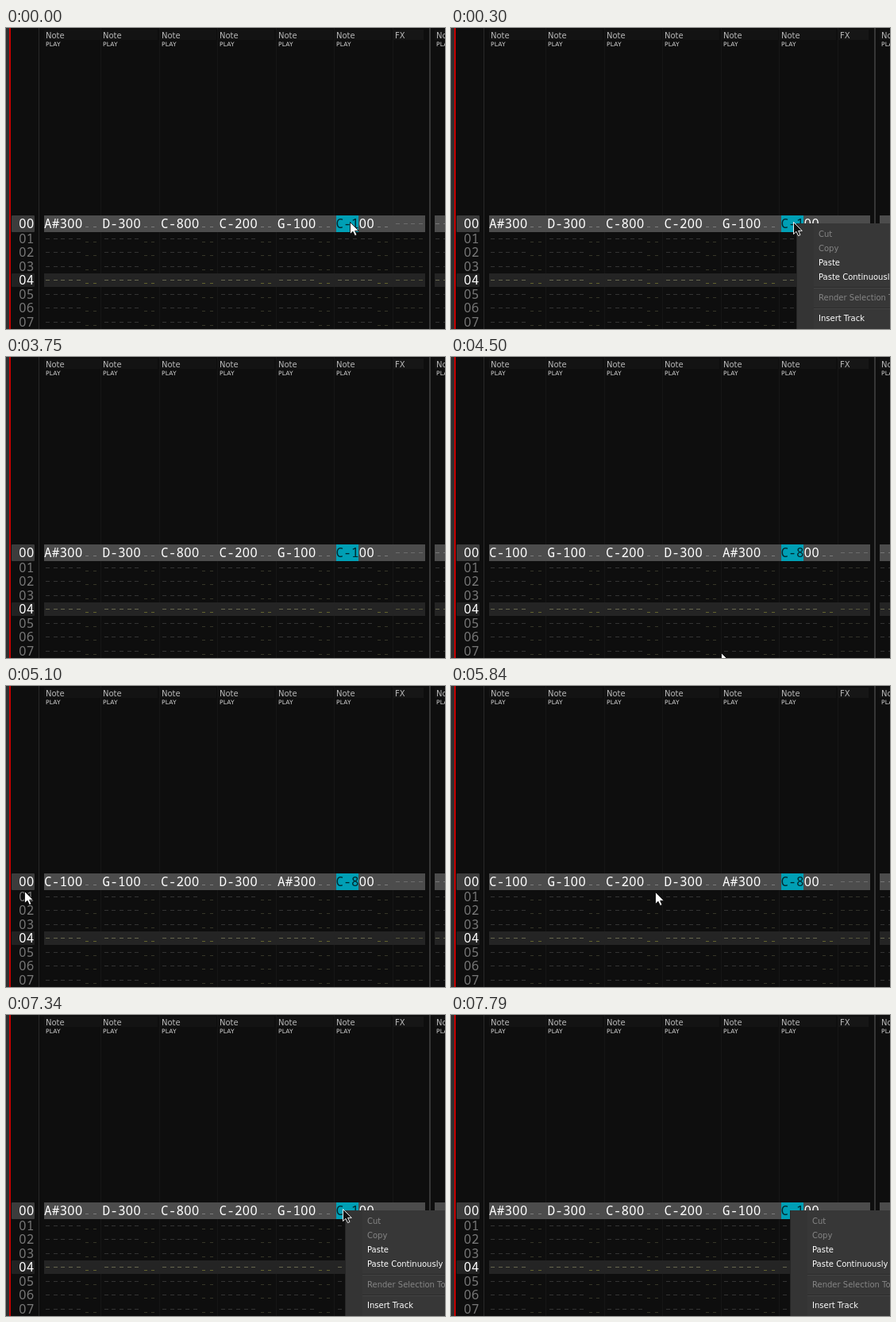
An HTML page that plays this animation: 553 px wide and 379 px high, repeating every 8000 ms.

```html
<!DOCTYPE html>
<html lang="en">
<head>
<meta charset="utf-8">
<title>Pattern editor</title>
<style>
  html, body { margin: 0; width: 100%; height: 100%; overflow: hidden; background: #0e0e0e; }
  svg { display: block; width: 553px; height: 379px; }
  text { white-space: pre; }
  .cell { font: 16px "Noto Sans Mono", "DejaVu Sans Mono", monospace; text-anchor: middle; }
  .zero { font-family: "Noto Sans", sans-serif; }
  .ui { font: 10px "DejaVu Sans", sans-serif; }
  .tiny { font: 7.5px "DejaVu Sans", sans-serif; letter-spacing: .2px; }

  #before, #after, #menu, #hover, #cursor { animation: 8s step-end infinite; }
  #before { animation-name: before; }
  #after { animation-name: after; }
  #menu { animation-name: menu; }
  #hover { animation-name: hover; }
  #cursor { animation-name: cursor, tone; }

  @keyframes before {
    0% { opacity: 1; } 48.75% { opacity: 0; } 84.25%, 100% { opacity: 1; }
  }
  @keyframes after {
    0% { opacity: 0; } 48.75% { opacity: 1; } 84.25%, 100% { opacity: 0; }
  }
  @keyframes menu {
    0% { transform: translate(600px, 246px); }
    3.75% { transform: translate(435px, 246px); }
    46.875% { transform: translate(600px, 246px); }
    91.75%, 100% { transform: translate(427px, 246px); }
  }
  @keyframes hover {
    0% { opacity: 0; } 95.5% { opacity: 1; } 97.375%, 100% { opacity: 0; }
  }
  /* The pointer is dark while the menu is open */
  @keyframes tone {
    0% { fill: #fff; stroke: #111; }
    3.75% { fill: #111; stroke: #fff; }
    46.875% { fill: #fff; stroke: #111; }
    91.75%, 100% { fill: #111; stroke: #fff; }
  }
  @keyframes cursor {
    0% { transform: translate(433px, 244px); }
    3.75% { transform: translate(431px, 244px); }
    7.5% { transform: translate(444px, 298px); }
    9.375% { transform: translate(-50px, 0); }
    56.25% { transform: translate(340px, 372px); }
    58.125% { transform: translate(226px, 247px); }
    60% { transform: translate(223px, 247px); }
    61.875% { transform: translate(39px, 253px); }
    63.75% { transform: translate(23px, 258px); }
    65.5% { transform: translate(57px, 263px); }
    67.375% { transform: translate(117px, 262px); }
    69.25% { transform: translate(174px, 261px); }
    71.125% { transform: translate(235px, 260px); }
    73% { transform: translate(257px, 259px); }
    76.75% { transform: translate(358px, 252px); }
    78.625% { transform: translate(411px, 257px); }
    80.5% { transform: translate(419px, 257px); }
    82.375% { transform: translate(424px, 248px); }
    84.25% { transform: translate(425px, 246px); }
    91.75% { transform: translate(424px, 244px); }
    95.5%, 100% { transform: translate(-50px, 0); }
  }
</style>
</head>
<body>
<svg viewBox="0 0 553 379" xmlns="http://www.w3.org/2000/svg">
  <g id="grid"></g>
  <g id="before"></g>
  <g id="after"></g>
  <g id="menu">
    <rect width="180" height="150" fill="#373737"/>
    <rect width="22" height="150" fill="#343434"/>
    <path d="M.5 150V0" stroke="#262626"/>
    <rect id="hover" x="4" y="40" width="170" height="18" fill="#575757"/>
  </g>
  <path id="cursor" d="M.5 .5V15.6L4 12.3L6.5 17.6L9 16.5L6.6 11.4H11.3Z"
        stroke-width=".9" stroke-linejoin="round"/>
</svg>
<script>
  const NS = "http://www.w3.org/2000/svg";
  const ADVANCE = 9.7, PITCH = 73.5, LEFT = 48;
  const $ = id => document.getElementById(id);
  const grid = $("grid");

  function add(parent, tag, attrs, content) {
    const el = document.createElementNS(NS, tag);
    for (const key in attrs) el.setAttribute(key, attrs[key]);
    if (content) el.textContent = content;
    parent.appendChild(el);
    return el;
  }
  const rect = (x, y, width, height, fill, rx = 0) =>
    add(grid, "rect", { x, y, width, height, fill, rx });
  const label = (parent, x, y, str, fill, cls = "ui") =>
    add(parent, "text", { x, y, fill, class: cls }, str);

  // Monospaced text, one centred glyph per cell
  function cells(parent, x, y, str, color) {
    const text = add(parent, "text", { y, class: "cell" });
    [...str].forEach((ch, i) => add(text, "tspan", {
      x: x + ADVANCE * (i + 0.5),
      fill: color(i),
      class: ch === "0" ? "zero" : ""
    }, ch));
  }

  const colX = i => LEFT + PITCH * i;

  function dashes(x, y, count, fill, width = 5) {
    for (let i = 0; i < count; i++) rect(Math.round(x + i * ADVANCE), y, width, 1, fill);
  }

  function header(x) {
    const textX = Math.max(50, Math.round(x + 0.5));
    rect(textX - 2, 2, 71, 13, "#131313");
    label(grid, textX, 13, "Note", "#b8b8b8");
    label(grid, textX, 23, "PLAY", "#dcdcdc", "tiny");
  }

  // Frame and track dividers
  rect(0, 0, 4, 379, "#303030");
  rect(4, 0, 2, 379, "#c80000");
  rect(41, 0, 1, 379, "#292929");
  rect(533, 0, 2, 379, "#363636");
  for (let i = 1; i < 7; i++) rect(Math.floor(colX(i) - 2), 0, 1, 379, "#161616");

  for (let i = 0; i < 6; i++) header(colX(i));
  rect(488, 2, 38, 13, "#161616");
  label(grid, 490, 13, "FX", "#b8b8b8");
  header(541);

  // Pattern lines
  for (let row = 0; row < 8; row++) {
    const y = row ? Math.floor(247.7 + 17.5 * row) : 246;
    const lead = row === 0, beat = row === 4;
    if (lead || beat) {
      const top = lead ? 236 : 309, h = lead ? 21 : 17;
      const fill = lead ? "#4c4c4c" : "#242424";
      rect(7, top, 29, h, lead ? "#3c3c3c" : "#222", 1);
      rect(LEFT, top, 480, h, fill);
      rect(540, top, 20, h, fill);
    }
    cells(grid, 16, y + 6, "0" + row, () => lead || beat ? "#fff" : "#777");

    const main = lead ? "#777" : beat ? "#66664e" : "#343434";
    const low = lead ? "#7c7c7c" : beat ? "#62622e" : "#363628";
    for (let i = 0; i < 6; i++) {
      if (!lead) dashes(colX(i) + 2, y, 5, main);
      dashes(colX(i) + 52, y + 4, 2, low, 4);
    }
    dashes(491, y, 4, lead ? "#6c6c6c" : beat ? "#56563c" : "#32322a");
    dashes(541, y, 2, main);
  }
  rect(416, 236, 28, 21, "#009fb5");

  function notes(id, list) {
    list.split(" ").forEach((note, i) =>
      cells($(id), colX(i), 252, note, c => i === 5 && c < 3 ? "#00262c" : "#fff"));
  }
  notes("before", "A#300 D-300 C-800 C-200 G-100 C-100");
  notes("after", "C-100 G-100 C-200 D-300 A#300 C-800");

  // Context menu
  const menu = $("menu"), on = "#fff", off = "#858585";
  [
    [17, "Cut", off], [35, "Copy", off], [53, "Paste", on],
    [71, "Paste Continuously", on], [97, "Render Selection To Sample", off],
    [123, "Insert Track", on]
  ].forEach(([y, str, fill]) => label(menu, 28, y, str, fill));
  for (const y of [80, 106]) {
    add(menu, "rect", { x: 22, y, width: 158, height: 1, fill: "#2c2c2c" });
    add(menu, "rect", { x: 22, y: y + 1, width: 158, height: 1, fill: "#434343" });
  }
</script>
</body>
</html>
```
